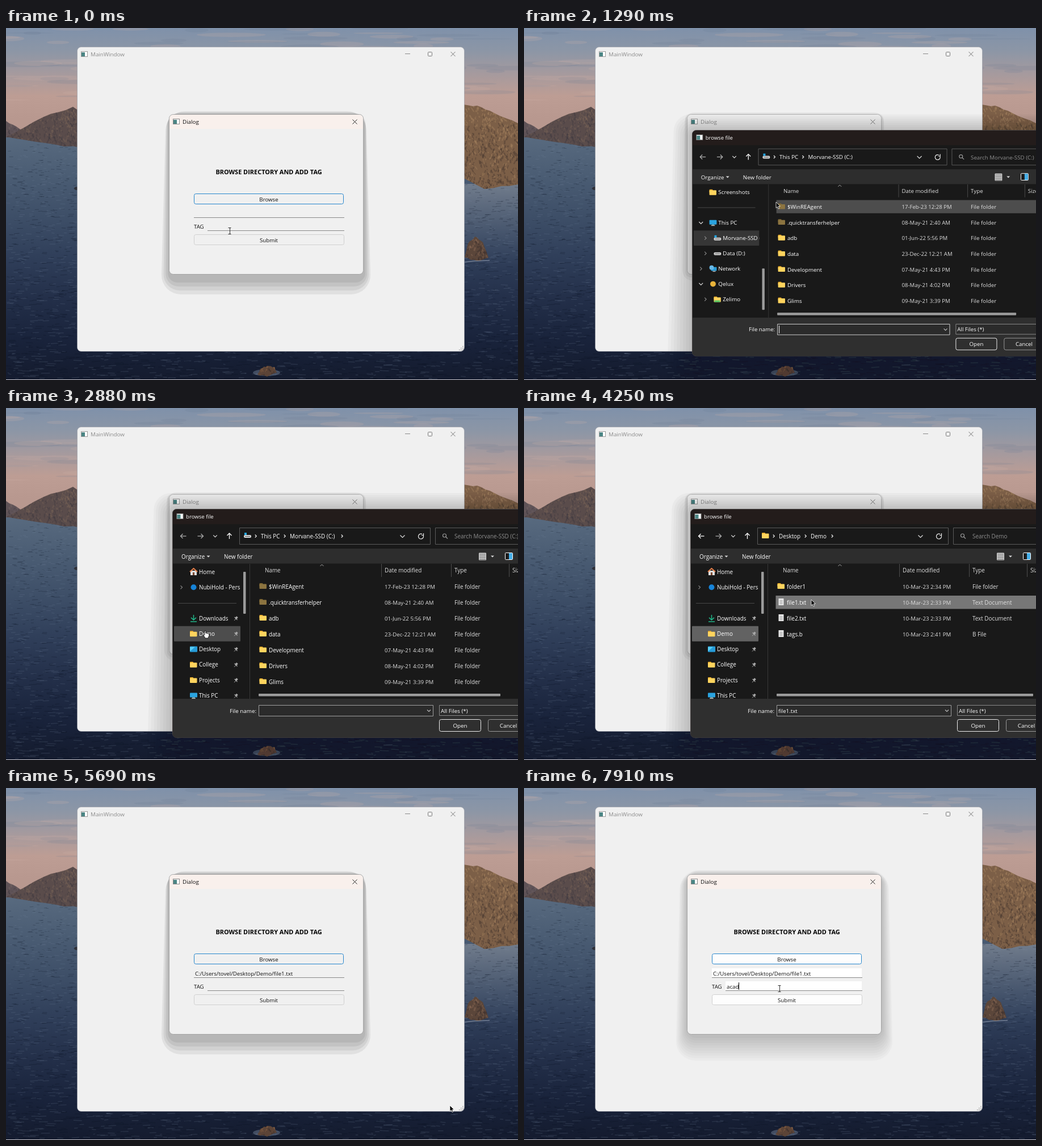
An HTML page with a canvas for the animation above (8 s loop, 902x621 px).

```html
<!DOCTYPE html>
<html lang="en">
<head>
<meta charset="utf-8">
<title>Tag dialog</title>
<style>
html, body { margin: 0; width: 100%; height: 100%; overflow: hidden; background: #1a2540; }
canvas { display: block; }
</style>
</head>
<body>
<canvas id="stage" width="902" height="621"></canvas>
<script>
const W = 902, H = 621, LOOP = 8000;
const screen = document.getElementById('stage').getContext('2d');
let g = screen;

const layer = w => Object.assign(document.createElement('canvas'), { width: w, height: H }).getContext('2d');
const photo = layer(W), sheet = layer(1000);

// Drawing helpers
function text(s, x, y, color = '#fff', size = 9.9, align = 'left', weight = 400) {
  g.font = `${weight} ${size}px "Open Sans", "Noto Sans", sans-serif`;
  g.textAlign = align;
  g.fillStyle = color;
  g.fillText(s, x, y + 3.6);
}
function rect(x, y, w, h, color) {
  g.fillStyle = color;
  g.fillRect(x, y, w, h);
}
function box(x, y, w, h, r, fill, stroke) {
  g.beginPath();
  g.roundRect(x, y, w, h, r);
  if (fill) { g.fillStyle = fill; g.fill(); }
  if (stroke) { g.strokeStyle = stroke; g.lineWidth = 1; g.stroke(); }
}
function trace(p) {
  g.beginPath();
  for (let i = 0; i < p.length; i += 2) g.lineTo(p[i], p[i + 1]);
}
function line(color, width, ...p) {
  trace(p);
  g.strokeStyle = color;
  g.lineWidth = width;
  g.stroke();
}
function poly(color, ...p) {
  trace(p);
  g.fillStyle = color;
  g.fill();
}
function disc(x, y, rx, ry, color) {
  g.beginPath();
  g.ellipse(x, y, rx, ry, 0, 0, 7);
  g.fillStyle = color;
  g.fill();
}
function ring(x, y, r, color, from = 0, to = 7) {
  g.beginPath();
  g.arc(x, y, r, from, to);
  g.strokeStyle = color;
  g.lineWidth = 1.2;
  g.stroke();
}
function fade(y0, y1, ...colors) {
  const f = g.createLinearGradient(0, y0, 0, y1);
  colors.forEach((c, i) => f.addColorStop(i / (colors.length - 1), c));
  return f;
}
function cross(x, y, r, color) {
  line(color, 1, x - r, y - r, x + r, y + r);
  line(color, 1, x + r, y - r, x - r, y + r);
}
const right = (x, y, c, r = 2.5) => line(c, 1.2, x - r / 2, y - r, x + r / 2, y, x - r / 2, y + r);
const down = (x, y, c, r = 4) => line(c, 1.2, x - r, y - r / 2, x, y + r / 2, x + r, y - r / 2);

// Nested shadow steps, each a little narrower at its top
function shadow(count, outer, inner, inset, r, alpha) {
  for (let i = 0; i < count; i++) {
    const u = count > 1 ? i / (count - 1) : 0;
    const [x0, y0, x1, y1] = outer.map((v, k) => v + (inner[k] - v) * u);
    const lean = inset * (1 - u), radius = r * (1 - u / 2);
    g.beginPath();
    g.moveTo((x0 + x1) / 2, y0);
    g.arcTo(x1 - lean, y0, x1, y1, radius);
    g.arcTo(x1, y1, x0, y1, radius);
    g.arcTo(x0, y1, x0 + lean, y0, radius);
    g.arcTo(x0 + lean, y0, x1, y0, radius);
    g.fillStyle = `rgba(0,0,0,${alpha})`;
    g.fill();
  }
}

// Backdrop
let seed = 77;
const rnd = () => (seed = (seed * 16807) % 2147483647) / 2147483647;

// A rugged shape through a few points, covered with slanted strokes
function land(base, dark, light, ...p) {
  const rough = [];
  let x0 = W, x1 = 0, y0 = H, y1 = 0;
  for (let i = 0; i < p.length; i += 2) {
    const x = p[i], y = p[i + 1], nx = p[(i + 2) % p.length], ny = p[(i + 3) % p.length];
    for (let k = 0; k < 4; k++) {
      const u = k / 4, jitter = k ? rnd() * 3 - 1.5 : 0;
      rough.push(x + (nx - x) * u, y + (ny - y) * u + jitter);
    }
    x0 = Math.min(x0, x); x1 = Math.max(x1, x);
    y0 = Math.min(y0, y); y1 = Math.max(y1, y);
  }
  g.save();
  poly(base, ...rough);
  g.clip();
  g.globalAlpha = .4;
  for (let i = (x1 - x0) * (y1 - y0) / 22; i > 0; i--) {
    const x = x0 + rnd() * (x1 - x0), y = y0 + rnd() * (y1 - y0), n = 2 + rnd() * 8;
    const shade = rnd() + (y - y0) / (y1 - y0) - .5;
    line(shade > .45 ? dark : light, 1 + rnd() * 2, x, y, x + n * (rnd() - .4), y + n * .7);
  }
  g.restore();
}

function paintPhoto() {
  g = photo;
  rect(0, 0, W, 210, fade(0, 160, '#7f91aa', '#8c96a6', '#a59a9e', '#bd9d94', '#b8988f'));
  for (let i = 0; i < 130; i++) {
    disc(rnd() * W, rnd() * 130, 15 + rnd() * 50, 1 + rnd() * 4,
      rnd() < .5 ? 'rgba(205,175,165,.2)' : 'rgba(98,116,142,.16)');
  }
  rect(0, 192, W, 429, fade(192, 621, '#586a7f', '#4a5c73', '#3d4e67', '#2f3e59', '#232f49', '#19233b', '#141b2e'));
  rect(800, 275, 102, 150, fade(275, 425, '#717c8c', 'rgba(70,84,108,0)'));
  for (let i = 0; i < 5200; i++) {
    const y = 205 + rnd() * 414, x = rnd() * W, n = 3 + rnd() * (y / 45);
    line(rnd() < .55 ? 'rgba(10,18,34,.26)' : 'rgba(138,156,180,.16)', .6 + y / 700, x, y, x + n, y + rnd() * 2 - 1);
  }
  land('#5f5357', '#443d44', '#7b6a68', 0, 164, 24, 178, 60, 195, 0, 193);
  land('#5a4c4b', '#3e383f', '#7d6859', 0, 192, 66, 157, 118, 139, 135, 150, 135, 212, 70, 203);
  disc(125, 283, 5, 3, '#2f3038');
  land('#7c5f47', '#45352d', '#ab8763', 800, 136, 830, 137, 860, 150, 902, 168, 902, 276, 843, 284, 800, 262);
  land('#5b463a', '#32292a', '#94705a', 808, 405, 814, 380, 826, 368, 840, 378, 850, 405, 830, 411);
  line('rgba(180,190,205,.5)', 1.5, 808, 413, 826, 411, 852, 410);
  disc(459, 608, 24, 6, 'rgba(150,165,190,.35)');
  land('#5c4437', '#33292a', '#966a48', 443, 611, 449, 601, 460, 596, 473, 598, 477, 608, 460, 615);
}

// Icons
function appIcon(x, y, dim) {
  rect(x, y, 12, 10, dim ? '#999' : '#888');
  rect(x + 1, y + 1, 10, 8, '#fff');
  rect(x + 1, y + 2, 6, 7, '#4b8584');
}
function folder(x, y, front = '#ffd45e', back = '#e8a824') {
  box(x, y - 5, 6, 6, 1, back);
  box(x, y - 3.5, 12.5, 8.5, 1, front);
}
const glyphs = {
  folder,
  pale: (x, y) => folder(x, y, '#8c7440', '#7c6530'),
  green(x, y) { folder(x, y); rect(x + 1, y + 2, 10, 3, '#54c866'); },
  file(x, y) {
    rect(x + 2, y - 6, 9, 12, '#e8e8e8');
    for (let i = 0; i < 4; i++) rect(x + 4, y - 3 + i * 2, 5, .8, '#999');
  },
  home(x, y) {
    rect(x + 1, y - 2, 11, 8, '#dedede');
    rect(x + 5, y + 1, 3, 5, '#7d4a33');
    line('#e9824c', 2, x, y, x + 6.5, y - 6, x + 13, y);
  },
  round: (x, y) => disc(x + 6.5, y, 5, 5, '#1683d8'),
  yellow: (x, y) => disc(x + 6.5, y, 5, 5, '#e8b33a'),
  down(x, y) {
    line('#21b88a', 1.5, x + 6.5, y - 6, x + 6.5, y + 3);
    line('#21b88a', 1.5, x + 2, y - 1, x + 6.5, y + 3, x + 11, y - 1);
    line('#21b88a', 1.5, x + 1, y + 6, x + 12, y + 6);
  },
  desk(x, y) { box(x, y - 5, 13, 10, 1, '#279cd8'); poly('#58cdf3', x, y + 4, x, y - 4, x + 9, y - 4); },
  pc(x, y) { box(x, y - 5, 13, 8, 1, '#2aa3df'); rect(x + 4, y + 3, 5, 2, '#8aa'); rect(x + 3, y + 4.5, 7, 1, '#bbb'); },
  drive(x, y) { box(x, y - 2, 13, 5, 2, '#d5d5d5'); rect(x + 2, y, 9, 1, '#555'); },
  system(x, y) { glyphs.drive(x, y + 1); rect(x + 1, y - 5, 4, 4, '#25a9e8'); },
  net(x, y) { box(x + 3, y - 3, 10, 7, 1, '#2a9dd8'); disc(x + 4, y - 2, 4, 4, '#68b9e8'); rect(x + 6, y + 4, 5, 1.5, '#bbb'); }
};

// Motion: the picture advances about every 125 ms, so progress comes in steps
function stepped(t, from, to) {
  if (t < from) return 0;
  const count = Math.round((to - from) / 125) + 1;
  const k = Math.floor((t - from) / (to - from) * (count - 1) + .15) + 1;
  return Math.min(1, k / count);
}
const easeOut = u => 1 - (1 - u) ** 4;
const within = (t, a, b) => t >= a && t < b;

// Events
const BLUR = 900, OPEN = 1170, ENTER = 3460, LOADED = 3580, PICK = 4250, CONFIRM = 5060, CLOSE = 5570, REPAINT = 5840;

// Pointer moves: start, end, destination
const moves = [
  [270, 750, 444, 307], [1870, 1990, 372, 366], [2760, 2880, 353, 399], [3730, 3850, 506, 338],
  [4550, CONFIRM, 782, 560], [REPAINT, 6350, 450, 354]
];
function pointer(t) {
  let x = 394, y = 358;
  for (const [from, to, nx, ny] of moves) {
    const u = easeOut(stepped(t, from, to));
    x += (nx - x) * u;
    y += (ny - y) * u;
  }
  return { x, y };
}
const overDemo = p => within(p.x, 296, 413) && within(p.y, 384, 411);
const overField = p => within(p.x, 331, 596) && (within(p.y, 318, 335) || within(p.y, 341, 359));

const DRIVE = 'Morvane-SSD';
const places = [
  'Home home', 'NubiHold - Personal round >', '', 'Downloads down pin', 'Demo folder pin', 'Desktop desk pin',
  'College folder pin', 'Projects folder pin', 'This PC pc pin', 'Documents folder pin', 'Pictures folder pin',
  'Music folder pin', 'Videos folder pin', 'Notes folder', 'Backup folder', 'Reports folder', 'Screenshots folder', '',
  'This PC pc v', DRIVE + ' (C:) system >>', 'Data (D:) drive >>', 'Network net >', 'Qelux yellow v', 'Zelimo green >>'
].map(s => s.match(/^(.*?) (\w+)(?: (pin|v|>+))?$/));
const rootFiles = [
  ['$WinREAgent', '17-Feb-23 12:28 PM', 'pale'], ['.quicktransferhelper', '08-May-21 2:40 AM', 'pale'],
  ['adb', '01-Jun-22 5:56 PM'], ['data', '23-Dec-22 12:21 AM'], ['Development', '07-May-21 4:43 PM'],
  ['Drivers', '08-May-21 4:02 PM'], ['Glims', '09-May-21 3:39 PM']
];
const demoFiles = [
  ['folder1', '10-Mar-23 2:34 PM'], ['file1.txt', '10-Mar-23 2:33 PM', 'file', 'Text Document'],
  ['file2.txt', '10-Mar-23 2:33 PM', 'file', 'Text Document'], ['tags.b', '10-Mar-23 2:41 PM', 'file', 'B File']
];

function mainWindow() {
  box(125.5, 33.5, 682, 537, 7, '#f0f0f0', 'rgba(150,154,162,.6)');
  appIcon(132, 41, true);
  text('MainWindow', 149, 46, '#8b8b8b', 9.85);
  line('#888', 1, 703, 45.5, 712, 45.5);
  box(743.5, 42.5, 7, 7, 1, null, '#777');
  cross(787.5, 46, 4, '#777');
  for (let i = 0; i < 3; i++)
    for (let j = 0; j <= i; j++) rect(804 - j * 3, 561 + i * 3, 1.6, 1.6, '#aaa');
}

function tagDialog(t) {
  const active = !within(t, BLUR, CLOSE), fresh = t >= REPAINT;
  if (active) {
    shadow(1, [245, 127, 672, 502], [], 13, 46, .025);
    if (fresh) shadow(10, [267, 145, 650, 481], [286, 152, 631, 441], 8, 34, .024);
    else shadow(4, [273, 147, 643, 470], [285, 151, 633, 449], 9, 34, .065);
  } else {
    shadow(2, [279, 149, 638, 446], [284, 151, 633, 440], 4, 18, .05);
  }
  box(287.5, 152.5, 342, 282, 7, '#f0f0f0', active ? '#a4a4a4' : '#b8b8b8');
  box(288, 153, 341, 25, [7, 7, 0, 0], active ? '#f9f0ec' : '#f0f0f0');
  appIcon(294, 160, !active);
  text('Dialog', 311, 165.5, active ? '#111' : '#888', 9.8);
  cross(614.5, 165.5, 4, active ? '#222' : '#777');
  text('BROWSE DIRECTORY AND ADD TAG', 463, 254, '#000', 10.95, 'center', 700);

  const hover = within(t, 630, 1290), field = fresh ? '#fff' : '#f0f0f0';
  box(331.5, 292.5, 263, 18, 3, hover ? '#e5f0f9' : fresh ? '#fdfdfd' : '#f0f0f0', '#2585cc');
  text('Browse', 463, 302, '#111', 9.7, 'center');
  rect(331, 318, 264, 16, field);
  line('#888', 1, 331, 334.5, 596, 334.5);
  if (t >= CLOSE) text('C:/Users/tovel/Desktop/Demo/file1.txt', 333, 327.5, '#111', 9.68);
  text('TAG', 331, 350, '#111', 9.6);
  rect(355, 341, 240, 17, field);
  line('#888', 1, 355, 357.5, 596, 357.5);
  const letters = t >= 7910 ? 4 : Math.min(3, Math.max(0, Math.floor((t - 6630) / 150)));
  text('acad'.slice(0, letters), 357, 350, '#111', 9.7);
  if (t >= 6500 && !within(t, 7760, 7910))
    rect(Math.floor(357 + g.measureText('acad'.slice(0, letters)).width), 343, 1, 13, '#000');
  box(331.5, 364.5, 264, 18, 3, fresh ? '#fdfdfd' : '#f0f0f0', '#d0d0d0');
  text('Submit', 463, 374, '#111', 9.7, 'center');
}

function sidebar(t) {
  const scroll = 16 * (1 - easeOut(stepped(t, 2020, 2390)));
  const selected = t < ENTER ? 19 : 4;
  g.save();
  g.beginPath();
  g.rect(294, 275, 119, 238);
  g.clip();
  places.forEach((place, i) => {
    const y = 289 + (i - scroll) * 27.3;
    if (y < 260 || y > 530) return;
    if (!place) return line('#484848', 1, 303, Math.round(y) + .5, 406, Math.round(y) + .5);
    const [, name, icon, mark] = place, indent = mark === '>>' ? 8 : 0;
    let fill = i === selected ? '#363636' : null;
    if (i === 4 && overDemo(pointer(t))) fill = '#4d4d4d';
    if (i === 4 && within(t, 3310, 4400)) fill = '#626262';
    if (fill) box(296, y - 13.5, 117, 27, 1, fill);
    if (mark === 'v') down(309, y, '#ddd', 3.5);
    else if (mark && mark !== 'pin') right(309 + indent, y, '#888', 3);
    glyphs[icon](324 + indent, y);
    text(name, 340 + indent, y);
    if (mark === 'pin') {
      line('#aaa', 3.5, 404.5, y + .5, 407.5, y - 2.5);
      line('#aaa', 1.3, 402.5, y - 2, 407.5, y + 3);
      line('#aaa', 1, 402, y + 4, 405, y + 1);
    }
  });
  g.restore();
  box(418, 289 + scroll * 8.5, 4.5, 74, 1, '#9b9b9b');
  line('#383838', 1, 429.5, 275, 429.5, 513);
}

function pickedRow(t) {
  if (t < PICK) return '#4d4d4d';
  if (t < 4820) return '#777';
  return t < 5180 ? '#626262' : '#353535';
}
function fileList(t) {
  const demo = t >= ENTER;
  [['Name', 456], ['Date modified', 667], ['Type', 790], ['Size', 892]].forEach(([s, x], i) => {
    text(s, x, 286.5, '#dedede');
    if (i) line('#4c4c4c', 1, x - 5.5, 275, x - 5.5, 298);
  });
  line('#aaa', 1, 553.5, 279, 556.5, 276, 559.5, 279);
  const files = !demo ? rootFiles : t < LOADED ? [] : demoFiles;
  files.forEach(([name, date, icon = 'folder', type = 'File folder'], i) => {
    const y = 315 + 28 * i;
    if (!demo && i === 0 && t < 1870) rect(443.5, y - 12, 600, 23.5, '#4d4d4d');
    if (demo && i === 1 && t >= 3850) rect(443.5, y - 12, 600, 23.5, pickedRow(t));
    glyphs[icon](446.5, y - 1);
    text(name, 463, y);
    text(date, 667, y, '#dedede', 9.7);
    text(type, 790, y, '#dedede');
  });
  box(445, 504, demo ? 452 : 426, 4.5, 1, '#9b9b9b');
}

function arrow(x, y, dx, dy, color) {
  line(color, 1.3, x - dx * 5, y - dy * 5, x + dx * 5, y + dy * 5);
  line(color, 1.3, x + dx + dy * 4, y + dy + dx * 4, x + dx * 5, y + dy * 5, x + dx - dy * 4, y + dy - dx * 4);
}
function navigation(t) {
  const demo = t >= ENTER, drive = DRIVE + ' (C:)';
  arrow(312.5, 226, -1, 0, demo ? '#fff' : '#aaa');
  arrow(342.5, 226, 1, 0, '#aaa');
  down(368.5, 226, '#ddd', 3.3);
  arrow(393.5, 226, 0, -1, '#fff');
  box(411.5, 211.5, 336, 29, 0, '#191919', '#5b5b5b');
  box(756.5, 211.5, 240, 29, 0, '#191919', '#5b5b5b');
  glyphs[demo ? 'folder' : 'system'](419, 225);
  right(440, 226, '#eee');
  text(demo ? 'Desktop' : 'This PC', 449, 226);
  right(demo ? 496 : 491, 226, '#eee');
  text(demo ? 'Demo' : drive, demo ? 505 : 500, 226);
  if (t >= 1560) right(demo ? 543 : 592, 226, '#eee');
  down(698.5, 226.5, '#ddd');
  ring(731, 226.5, 4.5, '#eee', -.4, 5.2);
  line('#eee', 1.2, 735.5, 221, 735.5, 224.5, 732, 224.5);
  ring(772.5, 225, 3, '#999');
  line('#999', 1.2, 774.5, 227, 778, 230.5);
  text('Search ' + (demo ? 'Demo' : drive), 790, 226.5, '#8f8f8f');

  text('Organize', 309, 262);
  text('New folder', 384, 262);
  for (const x of [356.5, 857]) poly('#ddd', x - 3, 260.5, x + 3, 260.5, x, 263.5);
  box(833, 255.5, 13, 13, 1, '#d8d8d8');
  for (let i = 0; i < 4; i++) rect(834, 257.5 + i * 3, 11, 1, '#555');
  box(879.5, 255.5, 13, 12, 1, '#1c1c1c', '#fff');
  rect(886, 256, 6, 11, '#45aee8');
}

function footer(t) {
  const pressed = t >= CONFIRM;
  text('File name:', 441, 534, '#fff', 9.8, 'right');
  box(445.5, 524.5, 307, 19, 0, '#2b2b2b', t < 1870 ? '#d0d0d0' : '#a0a0a0');
  if (t >= PICK) text('file1.txt', 448, 534, '#fff', 9.7);
  if (t < 2880 && Math.floor((t - 1330) / 530) !== 1) rect(448, 527, 1, 14, '#fff');
  down(745, 534, '#bbb', 3);
  box(763.5, 524.5, 240, 18, 0, '#2b2b2b', '#8a8a8a');
  text('All Files (*)', 766, 534, '#fff', 9.8);
  box(763.5, 549.5, 73, 21, 3, pressed ? '#636363' : '#2f2f2f', pressed ? '#999' : '#eee');
  text('Open', 800, 560, '#fff', 9.8, 'center');
  box(849.5, 549.5, 73, 21, 3, '#2f2f2f', '#9a9a9a');
  text('Cancel', 885, 560, '#fff', 9.8, 'center');
}

function fileBrowser(t) {
  const inactive = t >= 5450;
  shadow(8, [248, 150, 1100, 648], [288, 176, 1100, 592], 13, 30, .026);
  box(293.5, 178.5, 760, 403, 7, '#191919', '#464242');
  box(294, 179, 760, 26, [7, 0, 0, 0], inactive ? '#202020' : '#231c1b');
  rect(294, 248, 760, 26.5, '#2d2d2d');
  box(294, 513, 760, 68.5, [0, 0, 0, 7], '#2f2f2f');
  if (!inactive) appIcon(300.5, 186);
  text('browse file', inactive ? 300 : 317, 191.5, '#fff', 9.65);
  navigation(t);
  sidebar(t);
  fileList(t);
  footer(t);
}

// The browser zooms and fades as one sheet
function showBrowser(t) {
  const opening = stepped(t, OPEN, 1560), closing = stepped(t, CLOSE, 5690);
  const opacity = Math.min(1, opening * 2) * (1 - closing);
  if (!opacity) return;
  const scale = 1 - .19 * (1 - easeOut(opening)) - .08 * closing;
  if (opacity < 1) {
    g = sheet;
    g.clearRect(0, 0, 1000, H);
  }
  g.save();
  g.translate(540, 353);
  g.scale(scale, scale);
  g.translate(-540, -353);
  fileBrowser(t);
  g.restore();
  if (opacity < 1) {
    g = screen;
    g.globalAlpha = opacity;
    g.drawImage(sheet.canvas, 0, 0);
    g.globalAlpha = 1;
  }
}

function cursor(t) {
  const p = pointer(t), browsing = within(t, OPEN, CLOSE);
  g.save();
  g.translate(Math.round(p.x), Math.round(p.y));
  if (!browsing && overField(p)) {
    line('#333', 1, -2.5, -5.5, 2.5, -5.5);
    line('#333', 1, .5, -5, .5, 5);
    line('#333', 1, -2.5, 5.5, 2.5, 5.5);
  } else {
    const hand = browsing && overDemo(p);
    const shape = hand
      ? [-3, -6, -1, -6, -1, -2, 4, -1, 5, 2, 3, 7, -2, 7, -5, 2, -3, 1, -3, -6]
      : [0, 0, 0, 10.5, 2.4, 8.3, 4, 12, 5.8, 11.2, 4.2, 7.6, 7.4, 7.4, 0, 0];
    poly(hand ? '#fff' : '#000', ...shape);
    line(hand ? '#000' : '#fff', .8, ...shape);
  }
  g.restore();
}

function render(t) {
  g = screen;
  g.drawImage(photo.canvas, 0, 0);
  mainWindow();
  tagDialog(t);
  showBrowser(t);
  rect(0, 620, W, 1, '#cfccd2');
  cursor(t);
}

paintPhoto();
const start = performance.now();
function tick() {
  render((performance.now() - start) % LOOP);
  requestAnimationFrame(tick);
}
tick();
</script>
</body>
</html>
```
